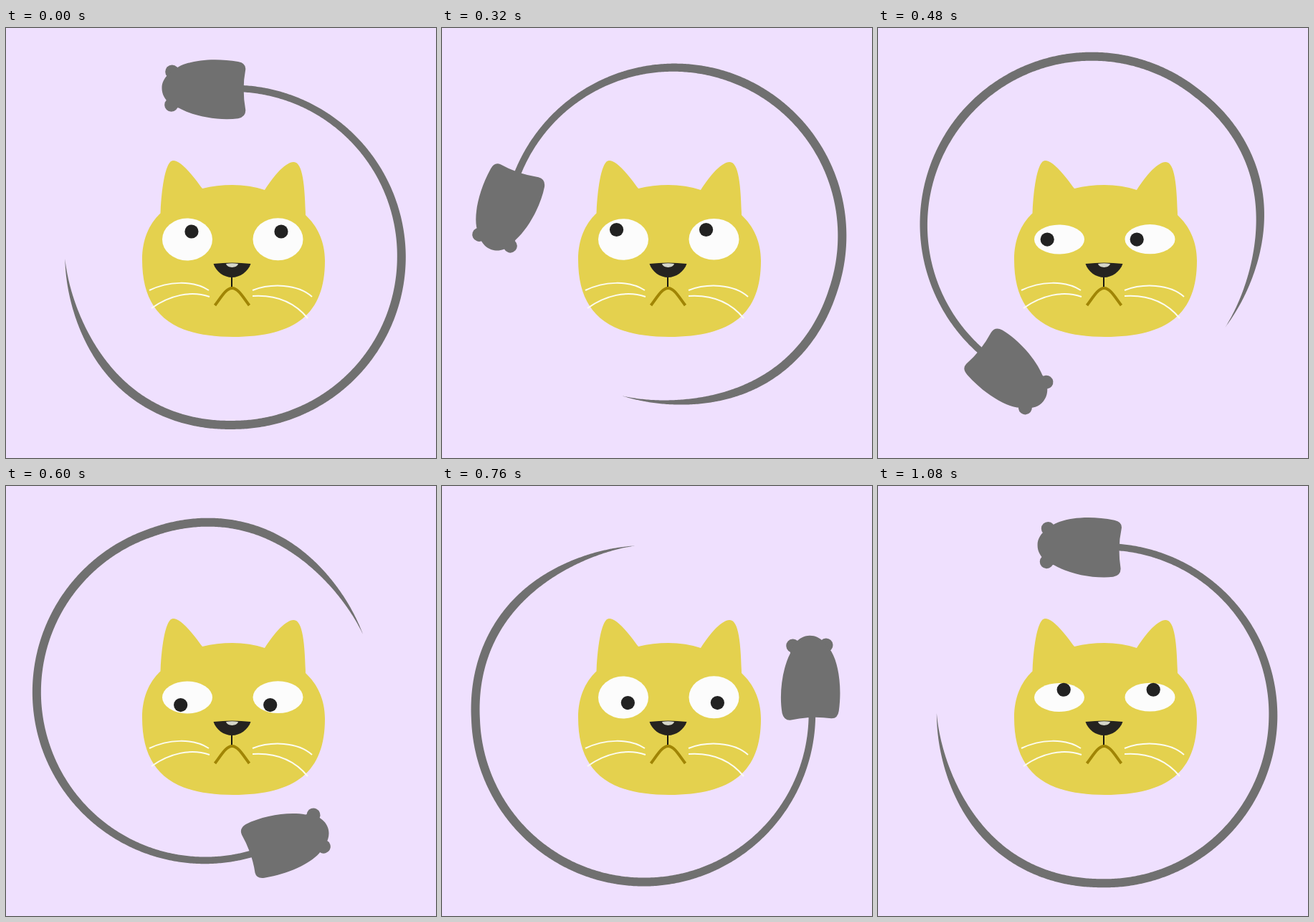
An HTML page for the animation above (1.12 s loop, 600 by 600 pixels).

```html
<!DOCTYPE html>
<html>
<head>
<meta charset="utf-8">
<style>
html, body { margin: 0; width: 100%; height: 100%; overflow: hidden; background: #efe0fe; }
svg { display: block; width: 100vw; height: 100vh; }
</style>
</head>
<body>
<svg viewBox="0 0 600 600">
  <g id="mouse" fill="#707070">
    <path id="tail"/>
    <circle cx="231.7" cy="61" r="9.5"/>
    <circle cx="230.7" cy="107.3" r="9.5"/>
    <path d="M241 54C258 45 290 41 324 47Q335 49 334.2 58Q329 85 334.2 114Q335 124 324 126.2C297 129.700 262 123.500 241 111.500C236 111 217.500 102 217.500 84C217.500 68 232 60 241 54Z"/>
  </g>
  <path fill="#e4d14e" d="M215.500 258.500C217 222 223 185 233 185C246 185 264 211 274 224Q294 219 316 219Q340 219 361 226C370 212 388 187 401.500 187C415 187 417 225 418 261C434 276 445 297 445 325C445 398 405 431 317 431C230 431 190 397 190 323C190 296 199 274 215.500 258.500Z"/>
  <g fill="#fcfcfc">
    <ellipse class="eye" cx="253" cy="295" rx="35"/>
    <ellipse class="eye" cx="379.5" cy="294.7" rx="35"/>
  </g>
  <g id="pupils" fill="#222">
    <circle cx="249.5" cy="293.5" r="9.6"/>
    <circle cx="374.5" cy="293.5" r="9.6"/>
  </g>
  <g fill="none" stroke-width="2">
    <path stroke="#fcfcf0" d="M200 366C225 354 260 351 283 366M203 391C228 373 258 366 284 375M344 366C370 356 407 357 427 375M344 374C375 372 402 382 421 405"/>
    <path stroke="#151510" d="M315 346V362"/>
    <path stroke="#a08505" stroke-width="4" d="M291.5 387C300 376 307 363 315.5 363C324 363 331 376 339.5 387"/>
  </g>
  <path fill="#252320" d="M289.500 329Q315.500 326 341.500 329C338 340 326 348 315.500 348C304 348 293 340 289.500 329Z"/>
  <path fill="#d5d6ca" d="M307 329Q315.500 327.500 324 329C322 335.500 309 335.500 307 329Z"/>
</svg>
<script>
const LOOP = 1120, STEP = 40, RAD = Math.PI / 180;
const $ = id => document.getElementById(id);
const eyes = document.querySelectorAll('.eye');

// Smooth 0..1 ramp between times a and b
const ease = (t, a, b) => {
  const u = Math.min(1, Math.max(0, (t - a) / (b - a)));
  return u * u * (3 - 2 * u);
};

// Tail: a nearly circular arc whose last quarter waves slightly and thins to a point
function tailPath() {
  const outer = [], inner = [], end = 179.5;
  for (let deg = -87; deg <= end; deg += 0.5) {
    const a = deg * RAD;
    const taper = Math.sin(Math.min(90, 1.75 * (end - deg)) * RAD);
    const half = (12 - 2.5 * Math.max(0, -Math.sin(a))) * taper / 2;
    const last = Math.max(0, deg / 90 - 1);
    const mid = 234.8 - 0.9 * Math.sin(a) + 2.5 * Math.sin(2 * Math.PI * last ** 1.2);
    const at = r => `${(317 + r * Math.cos(a)).toFixed(2)} ${(320 + r * Math.sin(a)).toFixed(2)}`;
    outer.push(at(mid + half));
    inner.unshift(at(mid - half));
  }
  return `M${outer.concat(inner).join('L')}Z`;
}

function draw() {
  const t = Math.floor((performance.now() + 1) / STEP) * STEP % LOOP;
  const turn = 360 * ease(t, 0, LOOP);
  $('mouse').setAttribute('transform', `rotate(${-turn} 300 300)`);

  const look = (-45 - turn) * RAD;
  $('pupils').setAttribute('transform', `translate(${13.4 * Math.cos(look)} ${13.4 * Math.sin(look)})`);

  const squint = ease(t, 280, 520) - ease(t, 520, 760) + ease(t, 760, 920);
  eyes.forEach(eye => eye.setAttribute('ry', 29.5 - 9.6 * squint));
  requestAnimationFrame(draw);
}

$('tail').setAttribute('d', tailPath());
draw();
</script>
</body>
</html>
```
